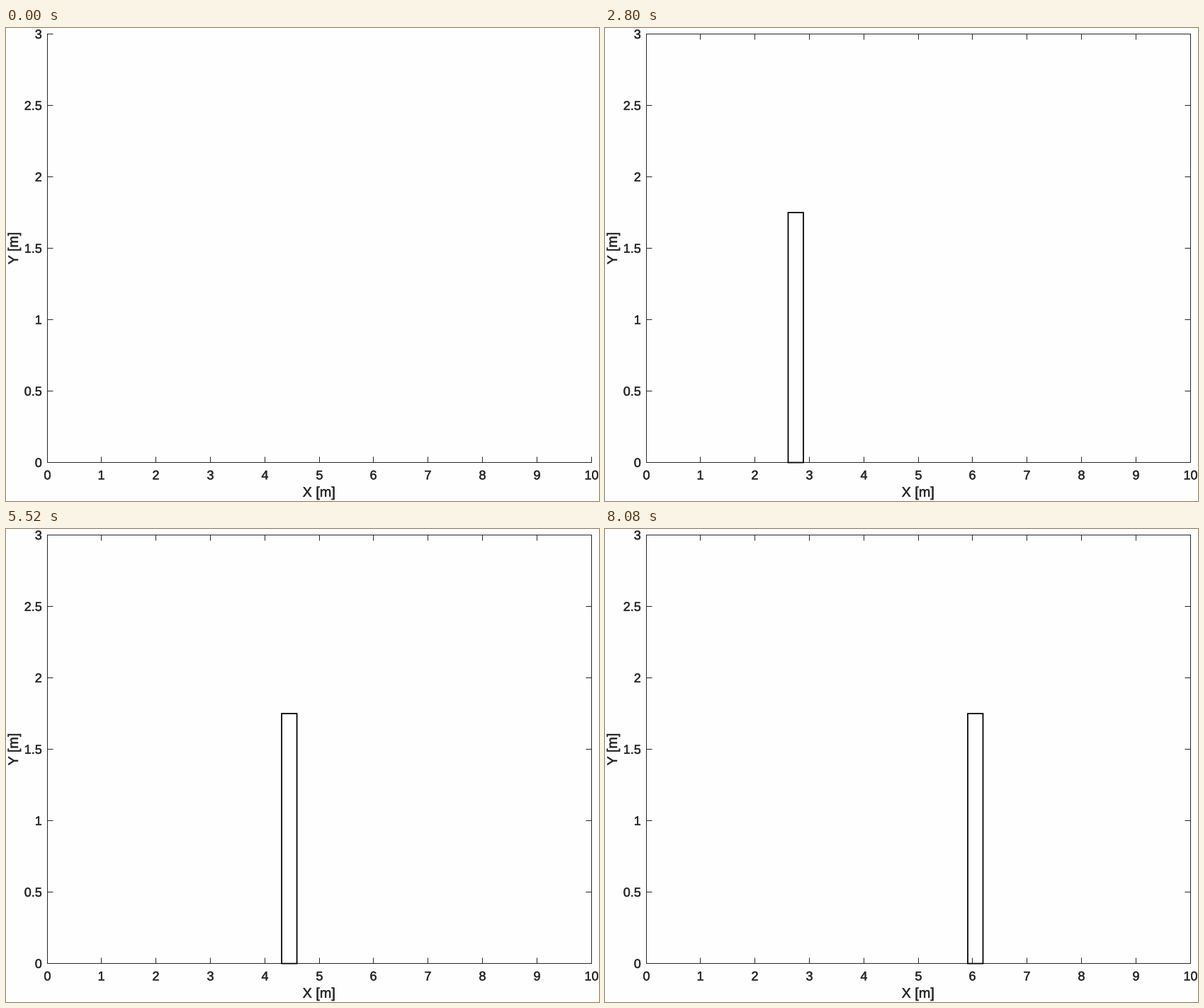
Write a matplotlib script that moves like this. It is 837x669 px and loops after 8160 ms.

```python
import math

import matplotlib.pyplot as plt
from matplotlib.animation import FuncAnimation
from matplotlib.collections import LineCollection
from matplotlib.patches import Rectangle
from matplotlib.patheffects import withStroke

W, H, DPI = 837, 669, 64
PT = 72 / DPI                    # points per pixel
FRAMES, STEP_MS = 102, 80

X0, XS = 58.0, 76.82             # pixel origin and pixels per metre
Y0, YS = 614.6, 202.03
TICK = 7.5
INK = "#262626"
BAR_W, BAR_H = 0.28, 1.75
START, SPEED = 1.0, 0.05         # metres, metres per step

plt.rcParams["font.family"] = "Liberation Sans"
plt.rcParams["text.hinting"] = "none"

fig = plt.figure(figsize=(W / DPI, H / DPI), dpi=DPI, facecolor="#fefefe")
ax = fig.add_axes([0, 0, 1, 1])
ax.set_xlim(0, W)
ax.set_ylim(H, 0)
ax.axis("off")


def px(x):
    return X0 + XS * x


def py(y):
    return Y0 - YS * y


def crisp(v):
    """Centre of the pixel that holds v, so hairlines stay sharp."""
    return math.floor(v) + 0.5


def add_lines(segments):
    lines = LineCollection(segments, colors=INK, linewidths=PT, capstyle="projecting")
    lines.set_snap(False)
    return ax.add_collection(lines)


def label(x, y, text, size=18, **kw):
    ax.text(x, y, text, fontsize=size * PT, color=INK, va="baseline",
            path_effects=[withStroke(linewidth=0.4 * PT, foreground=INK)], **kw)


xticks = [crisp(px(i)) for i in range(11)]
yticks = [crisp(py(i / 2)) for i in range(7)]
left, right = xticks[0], xticks[-1]
bottom, top = yticks[0], yticks[-1]

# Open axes: left and bottom only
add_lines(
    [[(left, top), (left, bottom)], [(left, bottom), (right, bottom)]]
    + [[(x, bottom), (x, bottom - TICK)] for x in xticks]
    + [[(left, y), (left + TICK, y)] for y in yticks]
)

# Closing half of the box
box = add_lines(
    [[(left, top), (right, top)], [(right, top), (right, bottom)]]
    + [[(x, top), (x, top + TICK)] for x in xticks]
    + [[(right, y), (right - TICK, y)] for y in yticks]
)

for i, x in enumerate(xticks):
    label(x, 638.4, str(i), ha="center")
for i, y in enumerate(yticks):
    label(50.8, y + 6.4, f"{i / 2:g}", ha="right")
label(441.7, 663, "X [m]", 19.8, ha="center")
label(17, 311.6, "Y [m]", 19.8, ha="center", rotation=90, rotation_mode="anchor")

bar = Rectangle((0, py(BAR_H)), BAR_W * XS, BAR_H * YS, fill=False,
                edgecolor="black", linewidth=1.75 * PT, snap=False, zorder=5)
ax.add_patch(bar)


def draw(k):
    box.set_visible(k > 0)
    bar.set_visible(k > 0)
    bar.set_x(px(START + SPEED * k - BAR_W / 2))
    return box, bar


anim = FuncAnimation(fig, draw, frames=FRAMES, init_func=lambda: draw(0),
                     interval=STEP_MS, repeat=True, repeat_delay=0)
plt.show()
```
